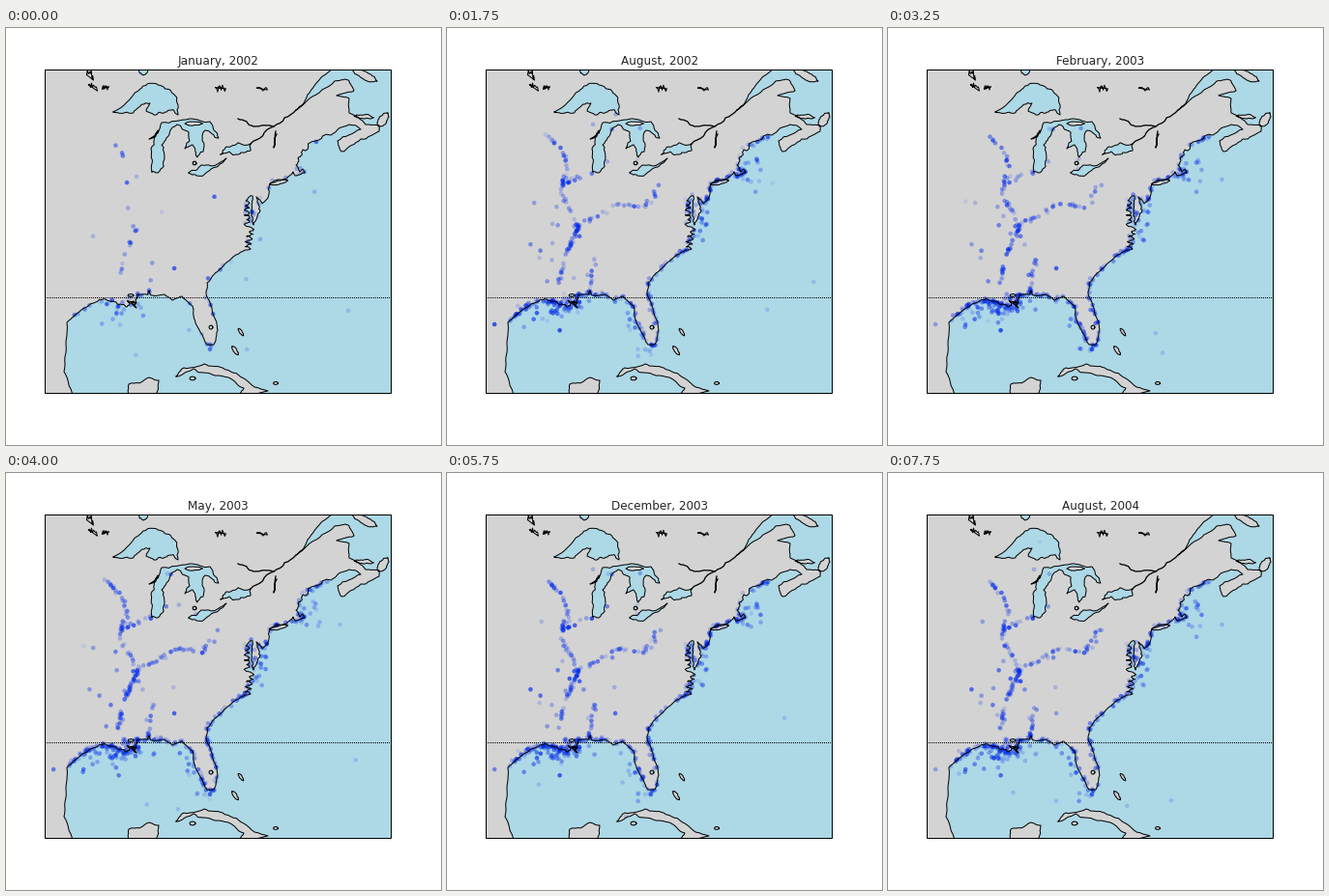
Recreate the animation shown at these times as a matplotlib script. Size 450x432 px, loop 8000 ms.

```python
import numpy as np
import matplotlib.pyplot as plt
from matplotlib.animation import FuncAnimation
from matplotlib.patches import Polygon, Rectangle

W, H = 450, 432
X0, Y0, X1, Y1 = 40, 43, 398, 378
MONTHS = ("January February March April May June July August "
          "September October November December").split()
FRAMES = 32
LAND, WATER = "lightgray", "lightblue"
DOT = (0.0, 0.16, 0.92)

rng = np.random.default_rng(7)


def pts(*values):
    return np.array(values, float).reshape(-1, 2)


def closed(p):
    return np.vstack([p, p[:1]])


def rough(p, amp=0.08, levels=3):
    """Midpoint displacement turns key points into a ragged shore."""
    for _ in range(levels):
        step = np.diff(p, axis=0)
        side = step[:, ::-1] * [1, -1]
        mid = p[:-1] + step / 2 + side * rng.normal(0, amp, (len(step), 1))
        out = np.empty((2 * len(p) - 1, 2))
        out[::2], out[1::2] = p, mid
        p = out
    return p


def zigzag(start, end, n, depth):
    """A run of narrow inlets cut to the left of a line."""
    p = np.linspace(start, end, n)
    p[1::2, 0] -= depth * rng.uniform(0.6, 1.2, len(p[1::2]))
    return p


def blob(x, y, length, width, angle=0):
    t = np.linspace(0, 2 * np.pi, 9)[:-1]
    c, s = np.cos(np.radians(angle)), np.sin(np.radians(angle))
    u, v = length / 2 * np.cos(t), width / 2 * np.sin(t)
    return np.c_[x + c * u - s * v, y + s * u + c * v]


# Key points of the coast, in pixels from the top left
texas = pts(71, 385, 60, 356, 62, 326, 63, 305, 73, 296, 87, 286, 95, 283)
delta = pts(95, 283, 111, 283, 118, 286, 125, 289, 130, 285, 135, 290,
            134, 281, 136, 276)
panhandle = pts(136, 276, 147, 276, 148, 272, 150, 277, 164, 276, 172, 282,
                182, 278, 193, 288)
florida = pts(193, 288, 195, 302, 201, 315, 208, 328, 215, 328, 219, 313,
              214, 296, 207, 275)
south = pts(207, 275, 208, 264, 220, 251, 233, 239, 243, 232, 250, 230)
bays = np.vstack([zigzag((253, 229), (257, 206), 10, 6),
                  zigzag((252, 206), (252, 179), 12, 5),
                  pts(255, 174, 254, 188, 256, 204, 263, 189, 259, 175,
                      265, 182)])
northeast = pts(265, 182, 272, 172, 273, 161, 292, 154, 297, 149, 299, 153,
                309, 150, 307, 146, 304, 149, 300, 142)
maine = pts(300, 142, 302, 135, 307, 126, 320, 117, 336, 111)
gulf = pts(336, 111, 355, 100, 367, 105, 343, 117, 347, 128, 367, 115,
           386, 107, 386, 101, 372, 100, 355, 88, 355, 73, 342, 70,
           360, 65, 354, 54, 340, 55)
estuary = pts(340, 55, 314, 73, 300, 85, 312, 69, 323, 55, 337, 43, 339, 36)
shore = np.vstack([
    rough(texas, 0.03), rough(delta, 0.22), rough(panhandle, 0.07),
    rough(florida, 0.05), rough(south, 0.05), rough(bays, 0.12),
    rough(northeast), rough(maine, 0.15), rough(gulf, 0.07),
    rough(estuary, 0.04)])

superior = pts(111, 87, 137, 65, 146, 58, 161, 60, 175, 70, 178, 90,
               166, 87, 153, 90, 145, 86, 149, 78, 134, 85, 122, 88)
michigan_huron = pts(151, 149, 157, 150, 164, 134, 161, 121, 170, 106,
                     177, 100, 189, 108, 190, 117, 185, 125, 193, 121,
                     198, 134, 204, 128, 206, 106, 220, 114, 211, 97,
                     190, 94, 161, 98, 148, 115, 157, 106, 150, 125)
erie = pts(189, 150, 202, 142, 228, 135, 218, 144, 197, 153)
ontario = pts(222, 131, 228, 123, 253, 120, 253, 127, 240, 131)
lakes = [superior, michigan_huron, erie, ontario, blob(195, 140, 4, 4),
         blob(142, 42, 10, 14), blob(129, 277, 6, 3), blob(212, 310, 4, 4)]

cuba = pts(176, 361, 184, 352, 205, 348, 224, 352, 246, 363, 271, 376,
           238, 384, 246, 373, 230, 362, 203, 357, 194, 353)
yucatan = pts(126, 386, 127, 369, 148, 362, 158, 365, 153, 386)
islands = [cuba, yucatan, blob(193, 363, 6, 4), blob(282, 160, 19, 4, -12),
           blob(237, 334, 11, 4, 55), blob(243, 315, 9, 3, 55),
           blob(279, 368, 5, 3), blob(371, 49, 28, 8, 25),
           blob(370, 92, 20, 4, 5), blob(390, 95, 17, 9, -55),
           blob(194, 99, 18, 4)]

streams = [pts(300, 85, 277, 102, 253, 120),
           pts(240, 94, 256, 102, 277, 102),
           pts(279, 107, 277, 124, 280, 110)]

# Routes that the dots follow inland
upper = pts(102, 110, 118, 125, 127, 146, 117, 168, 127, 188, 137, 203)
lower = pts(137, 203, 121, 238, 116, 268, 126, 281)
ohio = pts(137, 203, 154, 195, 178, 182, 204, 185, 220, 163)
illinois = pts(122, 162, 139, 153, 151, 148)
tombigbee = pts(147, 275, 148, 252, 154, 241)


def along(p, n, spread=1.2):
    """Scatter n sites along a path."""
    dist = np.r_[0, np.cumsum(np.hypot(*np.diff(p, axis=0).T))]
    t = rng.uniform(0, dist[-1], n)
    line = np.c_[np.interp(t, dist, p[:, 0]), np.interp(t, dist, p[:, 1])]
    return line + rng.normal(0, spread, (n, 2))


def cloud(x, y, sx, sy, n):
    return rng.normal((x, y), (sx, sy), (n, 2))


sites = np.vstack([
    along(upper, 52), along(lower, 66, 1), along(ohio, 50),
    along(illinois, 14), along(tombigbee, 18),
    along(texas[3:], 45), along(delta, 75, 1.6), along(panhandle, 48),
    along(florida, 55), along(south, 38), along(bays, 62, 1.5),
    along(northeast, 60), along(maine, 24),
    cloud(122, 289, 13, 6, 55),     # delta waters
    cloud(100, 298, 17, 9, 20),
    cloud(208, 332, 7, 3, 14),      # off the Florida tip
    cloud(186, 300, 6, 7, 8),
    cloud(314, 150, 10, 9, 24),     # off New England
    cloud(267, 196, 4, 12, 14),
    cloud(130, 210, 32, 26, 30),    # inland
    cloud(180, 118, 20, 18, 10)])   # around the lakes
weight = rng.beta(1.5, 2.2, len(sites))


def readings(month):
    """Positions and opacities of the dots for one month."""
    r = np.random.default_rng(500 + month)
    level = np.interp(month, [0, 1, 4, 9], [0.2, 0.45, 0.8, 1])
    seen = r.random(len(sites)) < level * (0.4 + 0.6 * weight)
    alpha = (0.08 + 0.65 * weight) * r.uniform(0.5, 1.2, len(sites))
    ocean = r.uniform((230, 240), (395, 375), (r.integers(1, 4), 2))
    bay = r.uniform((70, 305), (190, 360), (r.integers(0, 4), 2))
    xy = np.vstack([sites[seen], ocean, bay])
    a = np.r_[alpha[seen], np.full(len(ocean) + len(bay), 0.16)]
    return xy, np.clip(a, 0.07, 0.75)


plt.rcParams["font.family"] = "DejaVu Sans"
fig = plt.figure(figsize=(W / 72, H / 72), dpi=72, facecolor="white")
ax = fig.add_axes([0, 0, 1, 1])
ax.set(xlim=(0, W), ylim=(H, 0))
ax.axis("off")

frame = Rectangle((X0, Y0), X1 - X0, Y1 - Y0, fc=WATER, ec="none", zorder=0)
ax.add_patch(frame)


def stroke(p, width=1.0):
    line, = ax.plot(*p.T, color="black", lw=width, zorder=4,
                    solid_joinstyle="round")
    line.set_clip_path(frame)


def shape(p, color, order):
    fill = Polygon(p, fc=color, ec="none", zorder=order)
    ax.add_patch(fill)
    fill.set_clip_path(frame)
    stroke(closed(p))


def scribble(x, y, w, h, n=10):
    """Tangled outline of a small lake."""
    p = np.c_[np.linspace(-w, w, n) / 2, rng.normal(0, h / 3, n)]
    stroke(closed(p + (x, y)))


shape(np.vstack([shore, pts(30, 36, 30, 385)]), LAND, 1)
for lake in lakes:
    shape(rough(closed(lake), 0.1), WATER, 2)
for island in islands:
    shape(rough(closed(island), 0.07), LAND, 2.5)
for stream in streams:
    stroke(rough(stream, 0.07), 1.3)
for mark in [(87, 48, 7, 10), (90, 61, 9, 7), (103, 62, 7, 5),
             (222, 63, 11, 7), (265, 63, 11, 5), (130, 285, 9, 4)]:
    scribble(*mark)

# Unsnapped, so that each dash fills exactly one pixel
ax.plot([X0, X1], [279.5, 279.5], color="black", lw=1, ls=(0, (1, 1)),
        dash_capstyle="butt", snap=False, zorder=4)
ax.add_patch(Rectangle((X0, Y0), X1 - X0, Y1 - Y0, fill=False, ec="black",
                       lw=1, zorder=5))
dots = ax.scatter([], [], s=21, linewidths=0, zorder=3)
dots.set_clip_path(frame)
title = ax.text(219.75, 38, "", ha="center", va="baseline", fontsize=12,
                color="0.15")


def draw(month):
    xy, alpha = readings(month)
    dots.set_offsets(xy)
    dots.set_facecolors([(*DOT, a) for a in alpha])
    title.set_text(f"{MONTHS[month % 12]}, {2002 + month // 12}")
    return dots, title


anim = FuncAnimation(fig, draw, frames=FRAMES, interval=250, repeat=True)
plt.show()
```
